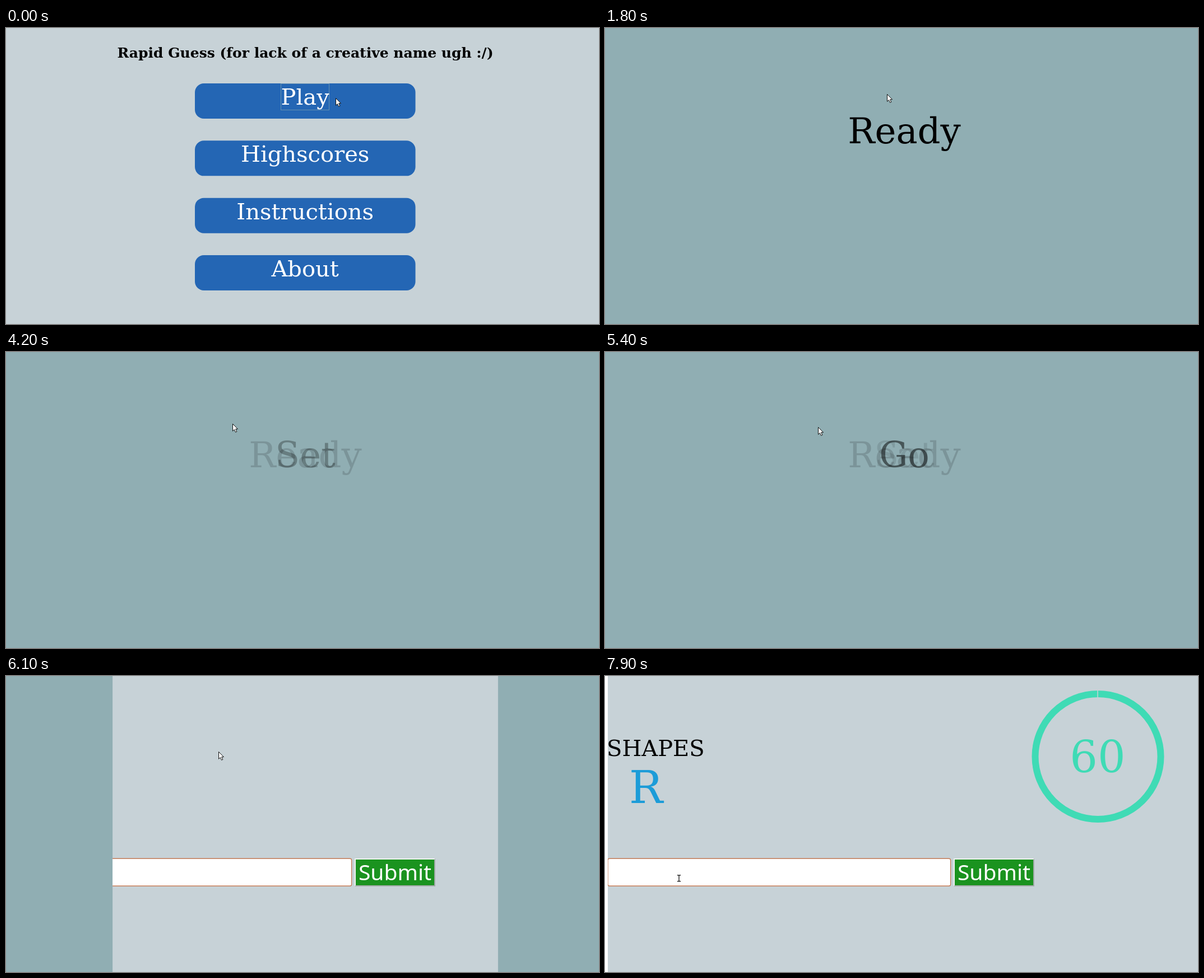
An HTML page for the animation above (8 s loop, 1058 by 529 pixels).

```html
<!DOCTYPE html>
<html lang="en">
<head>
<meta charset="utf-8">
<title>Quiz</title>
<style>
html, body { margin: 0; width: 100%; height: 100%; overflow: hidden; }
svg { display: block; width: 1058px; height: 529px; }
text { font-family: "DejaVu Serif", serif; }
.mid { text-anchor: middle; }
.word { font-size: 64px; }
</style>
</head>
<body>
<svg viewBox="0 0 1058 529">
  <defs>
    <clipPath id="clip"><rect id="slit" y="0" height="529"/></clipPath>
  </defs>

  <g id="menu">
    <rect width="1058" height="529" fill="#c7d2d7"/>
    <text class="mid" x="534" y="53" font-size="25" font-weight="bold">Rapid Guess (for lack of a creative name ugh :/)</text>
    <g id="buttons" fill="#fff" font-size="40"></g>
    <rect id="focus" x="490.5" y="99.5" width="86" height="47" fill="none" stroke="#a9bfae" stroke-dasharray="1 1"/>
  </g>

  <g id="countdown">
    <rect width="1058" height="529" fill="#90aeb3"/>
    <text class="mid word" id="ready" x="534" y="206">Ready</text>
    <text class="mid word" id="set" x="534" y="206">Set</text>
    <text class="mid word" id="go" x="534" y="206">Go</text>
  </g>

  <g id="quiz" clip-path="url(#clip)">
    <rect width="1058" height="529" fill="#c7d2d7"/>
    <rect x="5" y="326.2" width="611.6" height="49" rx="3" fill="#fff" stroke="#c57c58" stroke-width="1.4"/>
    <rect x="622" y="326" width="144" height="50" fill="#a3aaa9"/>
    <path d="M622 376V326H766L764 328H624V374Z" fill="#eef2f0"/>
    <rect x="624" y="328" width="140" height="46" fill="#1a931f"/>
    <text class="mid" x="694" y="365" fill="#fff" style="font:39px 'Noto Sans',sans-serif">Submit</text>
    <g id="question">
      <text x="3" y="143" font-size="40">SHAPES</text>
      <text x="43" y="227" font-size="80" fill="#1c9cd8">R</text>
      <circle cx="879.5" cy="144" r="112" fill="none" stroke="#3fdbb5" stroke-width="12"/>
      <path id="gap" d="M879 25V38" stroke="#c7d2d7" stroke-width="1.5"/>
      <text class="mid" x="879" y="172" font-size="78" fill="#3fdbb5">60</text>
    </g>
  </g>

  <path id="arrow" d="M.5 .5V13.3L3.4 10.6L5.5 15.3L7.8 14.3L5.7 9.7H9.5Z" fill="#fff" stroke="#111" stroke-linejoin="round"/>
  <g id="beam" fill="none">
    <path d="M129 356H131L132 357L133 356H135M132 357V366M129 367H131L132 366L133 367H135" stroke="#fff" stroke-width="3"/>
    <path d="M129 356H131L132 357L133 356H135M132 357V366M129 367H131L132 366L133 367H135" stroke="#222" stroke-width="1.4"/>
  </g>
</svg>
<script>
const $ = id => document.getElementById(id);
const LOOP = 8000, STEP = 100;

$('buttons').innerHTML = ['Play', 'Highscores', 'Instructions', 'About'].map((label, i) => {
  const y = 99 + i * 102.33;
  return `<rect x="337" y="${y}" width="393.5" height="63" rx="16" fill="#2466b4"/>
    <text class="mid" x="533.7" y="${y + 38}">${label}</text>`;
}).join('');

// Pointer positions: time, x, y
const path = [
  [0, 588, 125], [900, 560, 142], [1700, 525, 136], [1900, 480, 100],
  [2200, 428, 60], [2500, 415, 89], [2800, 412, 108], [3600, 412, 123],
  [4000, 410, 126], [4200, 404, 128], [4700, 380, 133], [5100, 380, 133],
  [5400, 380, 134], [5800, 379, 135], [7700, 379, 135], [7900, 131, 355]
];

const ramp = (t, from, to) => Math.min(1, Math.max(0, (t - from) / (to - from)));
const swing = p => (1 - Math.cos(Math.PI * p)) / 2;
const show = (id, on) => $(id).style.display = on ? '' : 'none';
const fade = (id, alpha) => $(id).style.opacity = alpha;

function pointer(t) {
  let i = 1;
  while (i < path.length - 1 && path[i][0] < t) i++;
  const a = path[i - 1], b = path[i], p = ramp(t, a[0], b[0]);
  return [1, 2].map(k => Math.round(a[k] + (b[k] - a[k]) * p));
}

function draw(t) {
  show('menu', t < 1800);
  show('focus', t < 100);
  show('countdown', t >= 1800 && t < 6300);
  show('quiz', t >= 6000);
  show('question', t >= 6300);
  show('gap', t >= 7800);

  // Faded words leave a faint trace behind
  fade('ready', Math.max(t < 2800 ? .22 : .14, 1 - ramp(t, 1900, 2700)));
  fade('set', ramp(t, 2700, 3000) * Math.max(t < 4300 ? .28 : .1, 1 - ramp(t, 3300, 4000)));
  fade('go', ramp(t, 4200, 4600) * (1 - ramp(t, 5000, 5800)));

  const width = 1058 * swing(ramp(t, 5900, 6235));
  $('slit').setAttribute('x', 534 - width / 2);
  $('slit').setAttribute('width', width + 12 * ramp(t, 6200, 6300));

  show('arrow', t < 7900);
  show('beam', t >= 7900);
  $('arrow').setAttribute('transform', `translate(${pointer(t)})`);
}

const start = performance.now();
function tick() {
  const t = (performance.now() - start) % LOOP;
  draw(Math.floor(t / STEP) * STEP);
  requestAnimationFrame(tick);
}
tick();
</script>
</body>
</html>
```
